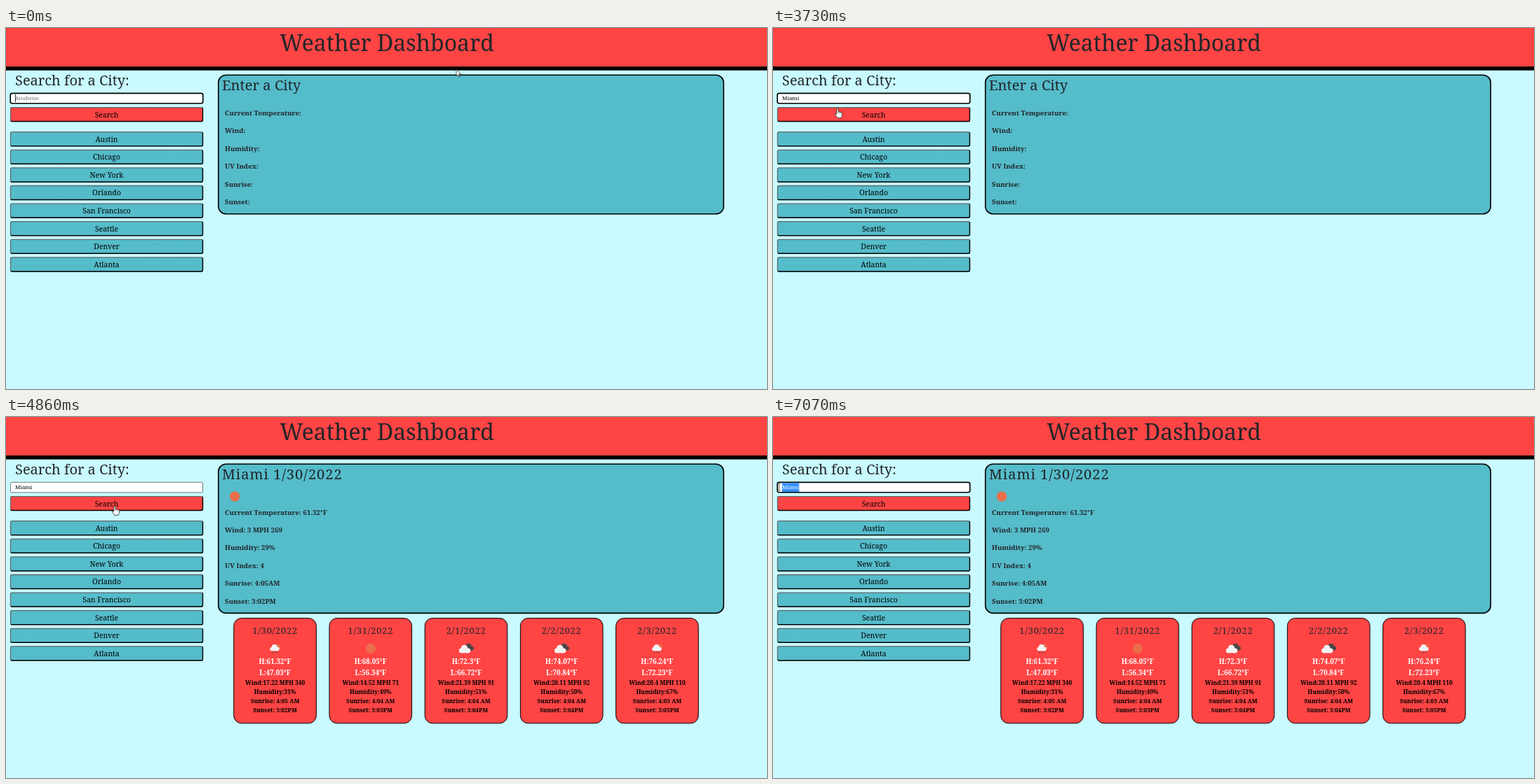
Recreate the animation shown at these times as an HTML page with a canvas. Size 1085 px wide and 516 px high, loop 8 s.

```html
<!DOCTYPE html>
<html lang="en">
<head>
<meta charset="utf-8">
<title>Weather Dashboard</title>
<style>
html, body { margin: 0; width: 100%; height: 100%; overflow: hidden; background: #c9faff; }
canvas { display: block; width: 1085px; height: 516px; }
</style>
</head>
<body>
<canvas id="stage"></canvas>
<script>
const W = 1085, H = 516, LOOP = 8000, TICK = 1000 / 15;
const RED = '#ff4444', TEAL = '#55bcca', SKY = '#c9faff', INK = '#212529', SUN = '#eb6e4b';
const FAMILY = '"Noto Serif", Cambria, serif';

const CITIES = ['Austin', 'Chicago', 'New York', 'Orlando', 'San Francisco', 'Seattle', 'Denver', 'Atlanta'];
const LABELS = ['Current Temperature:', 'Wind:', 'Humidity:', 'UV Index:', 'Sunrise:', 'Sunset:'];
const VALUES = ['61.32°F', '3 MPH 269', '29%', '4', '4:05AM', '3:02PM'];
const DAYS = [
  ['1/30/2022', rain, '61.32', '47.03', '17.22 MPH 340', '31', '4:05', '3:02'],
  ['1/31/2022', sun, '68.05', '56.34', '14.52 MPH 71', '49', '4:04', '3:03'],
  ['2/1/2022', clouds, '72.3', '66.72', '21.39 MPH 91', '51', '4:04', '3:04'],
  ['2/2/2022', clouds, '74.07', '70.84', '20.11 MPH 92', '50', '4:04', '3:04'],
  ['2/3/2022', rain, '76.24', '72.23', '20.4 MPH 110', '67', '4:03', '3:05']
];

const CITY = 'Miami';
const KEYS = [2060, 2260, 2460, 2600, 2730];
const BLUR = 4200, HEADING = 4390, DATA = 4860, FOCUS = 6330, DRAG = 6400;

// Pointer path: time, x, y
const PATH = [
  [0, 642, 59], [67, 642, 59], [333, 350, 115], [533, 160, 147], [800, 79, 104],
  [1267, 79, 104], [1600, 70, 105], [3667, 70, 105], [3733, 92, 115], [4267, 155, 127],
  [5000, 155, 127], [5200, 158, 150], [5400, 154, 171], [5533, 154, 171], [5733, 153, 170],
  [6000, 112, 136], [6333, 55, 100], [6400, 55, 100], [6867, 4, 99], [7000, 4, 99], [7067, 8, 100]
];

const canvas = document.getElementById('stage');
const dpr = window.devicePixelRatio || 1;
canvas.width = W * dpr;
canvas.height = H * dpr;
const c = canvas.getContext('2d');
c.scale(dpr, dpr);

function text(str, x, y, size, { color = INK, bold = false, align = 'left', gap = 0 } = {}) {
  c.font = `${bold ? 'bold ' : ''}${size}px ${FAMILY}`;
  c.letterSpacing = gap + 'px';
  c.textAlign = align;
  c.fillStyle = color;
  c.fillText(str, x, y);
  c.letterSpacing = '0px';
}

function box(x, y, w, h, r, fill, stroke, line) {
  c.beginPath();
  c.roundRect(x, y, w, h, r);
  c.fillStyle = fill;
  c.fill();
  if (!stroke) return;
  c.strokeStyle = stroke;
  c.lineWidth = line;
  c.stroke();
}

function poly(points, fill, stroke) {
  c.beginPath();
  points.forEach(([x, y]) => c.lineTo(x, y));
  c.closePath();
  c.fillStyle = fill;
  c.fill();
  if (stroke) {
    c.strokeStyle = stroke;
    c.lineWidth = 0.8;
    c.stroke();
  }
}

function disc(x, y, r, fill) {
  c.beginPath();
  c.arc(x, y, r, 0, Math.PI * 2);
  c.fillStyle = fill;
  c.fill();
}

function button(label, mid, fill) {
  const x = 6.5, y = mid - 10, w = 274, h = 20;
  box(x, y, w, h, 2, fill, '#60686a', 1.3);
  c.save();
  c.beginPath();
  [[x - 1, y + h + 1], [x + 2, y + h - 2], [x + w - 2, y + 2], [x + w + 1, y - 1], [x + w + 1, y + h + 1]]
    .forEach(p => c.lineTo(...p));
  c.clip();
  box(x, y, w, h, 2, fill, '#000', 1.5);
  c.restore();
  text(label, 143.5, mid + 3.9, 10.4, { color: '#000', align: 'center' });
}

function sun(x, y) {
  disc(x, y, 7.2, SUN);
}

function cloud(x, y, s, fill) {
  disc(x - 5 * s, y + 2 * s, 3.6 * s, fill);
  disc(x - 0.5 * s, y - 1.5 * s, 5 * s, fill);
  disc(x + 5 * s, y + 2 * s, 3.6 * s, fill);
  c.fillRect(x - 5 * s, y, 10 * s, 5.6 * s);
}

function clouds(x, y) {
  cloud(x + 4, y - 2, 0.8, '#484849');
  cloud(x - 2, y + 1, 0.95, '#f2f2f2');
}

function rain(x, y) {
  disc(x + 3.5, y - 2.5, 4, SUN);
  cloud(x - 0.5, y - 1, 0.78, '#f2f2f2');
  c.strokeStyle = '#6b4a4c';
  c.lineWidth = 0.9;
  for (let i = -1; i < 2; i++) {
    c.beginPath();
    c.moveTo(x + i * 3.2, y + 4);
    c.lineTo(x + i * 3.2 - 1, y + 6.8);
    c.stroke();
  }
}

function pointerAt(t) {
  const i = PATH.findIndex(k => k[0] > t);
  if (i < 0) return PATH[PATH.length - 1].slice(1);
  const [t0, x0, y0] = PATH[i - 1], [t1, x1, y1] = PATH[i];
  const p = (t - t0) / (t1 - t0);
  return [x0 + (x1 - x0) * p, y0 + (y1 - y0) * p];
}

function arrow(x, y) {
  poly([[0, 0], [0, 9.6], [2.2, 7.7], [3.7, 11], [5.2, 10.3], [3.8, 7.1], [6.6, 7]]
    .map(([a, b]) => [x + a, y + b]), '#fff', '#222');
}

function hand(x, y) {
  poly([[-1, 0.4], [0, 0], [1, 0.5], [1.2, 4.6], [3, 4.7], [4.6, 5.2], [6.2, 5.8], [6.6, 7],
    [6.3, 10.6], [5.2, 13.4], [-0.2, 13.4], [-1.8, 11], [-3.8, 8], [-3.2, 7], [-1.2, 8.2]]
    .map(([a, b]) => [x + a, y + b]), '#fff', '#222');
  c.beginPath();
  for (const dx of [1.2, 3, 4.7]) {
    c.moveTo(x + dx, y + 5);
    c.lineTo(x + dx, y + 7.2);
  }
  c.lineWidth = 0.5;
  c.stroke();
}

function beam(x, y) {
  x = Math.round(x) + 0.5;
  c.beginPath();
  c.moveTo(x - 2.3, y - 5.2);
  c.quadraticCurveTo(x, y - 5.2, x, y - 3.8);
  c.lineTo(x, y + 3.8);
  c.quadraticCurveTo(x, y + 5.2, x - 2.3, y + 5.2);
  c.moveTo(x + 2.3, y - 5.2);
  c.quadraticCurveTo(x, y - 5.2, x, y - 3.8);
  c.moveTo(x + 2.3, y + 5.2);
  c.quadraticCurveTo(x, y + 5.2, x, y + 3.8);
  c.strokeStyle = '#333';
  c.lineWidth = 0.8;
  c.stroke();
}

function pointer([x, y]) {
  const inColumn = x > 6 && x < 281;
  const onCity = y > 148 && y < 353 && (y - 148.1) % 25.6 < 21;
  if (y > 93 && y < 108 && x < 281) beam(x, y);
  else if (inColumn && (y > 113 && y < 134 || onCity)) hand(x, y);
  else arrow(x, y);
}

function field(t, mouseX) {
  const focused = t < BLUR || t >= FOCUS;
  const typed = CITY.slice(0, KEYS.filter(k => t >= k).length);
  const left = 13, base = 103.4, size = 7.9;
  if (focused) box(6.2, 93.4, 274.6, 14.4, 2.5, '#fff', '#000', 1.6);
  else box(6.5, 93.3, 274, 14.6, 1.5, '#fff', '#767676', 1);
  text(typed || 'Anaheim', left, base, size, { color: typed ? '#000' : '#757575' });
  const edge = n => left + c.measureText(typed.slice(0, n)).width;
  const end = edge(typed.length);

  if (t >= DRAG) {
    let n = 0;
    while (n < typed.length && (edge(n) + edge(n + 1)) / 2 < mouseX) n++;
    if (n < typed.length) {
      c.fillStyle = '#3390ff';
      c.fillRect(edge(n), 94.5, end - edge(n), 12.5);
      text(typed.slice(n), edge(n), base, size, { color: '#fff' });
      return;
    }
  }
  const since = [0, ...KEYS, FOCUS].filter(k => t >= k).pop();
  if (focused && Math.floor((t - since) / 525) % 2 === 0) {
    c.fillStyle = '#000';
    c.fillRect(Math.round(end), 95, 0.8, 11);
  }
}

function panel(t) {
  const found = t >= HEADING, shift = found ? 14.6 : 0;
  box(302.8, 67.2, 720.4, 198.6 + shift, 11, TEAL, '#000', 1.6);
  if (found) {
    text(CITY + ' 1/30/2022', 308, 89, 20.2, { gap: 0.9 });
    sun(326.2, 113.6);
  } else {
    text('Enter a City', 308, 89, 20.2);
  }
  LABELS.forEach((label, i) => {
    const line = t >= DATA ? label + ' ' + VALUES[i] : label;
    text(line, 312, 125 + shift + i * 25.4, 9.7, { bold: true });
  });
}

function card([date, icon, high, low, wind, humid, rise, set], i) {
  const x = 324.8 + i * 136.2, mid = x + 58.8;
  box(x, 287.6, 117.6, 150.2, 11, RED, '#000', 1);
  text(date, mid, 310, 13, { align: 'center', gap: 0.7 });
  icon(mid, 331);
  const row = (str, y, size, color) => text(str, mid, y, size, { color, bold: true, align: 'center' });
  row(`H:${high}°F`, 353.3, 9.9, '#fff');
  row(`L:${low}°F`, 368.5, 9.9, '#fff');
  row(`Wind:${wind}`, 382.5, 8.4, '#000');
  row(`Humidity:${humid}%`, 396.2, 8.4, '#000');
  row(`Sunrise: ${rise} AM`, 409.2, 8.3, '#000');
  row(`Sunset: ${set}PM`, 422.2, 8.3, '#000');
}

function draw(now) {
  const t = now % LOOP;
  const mouse = pointerAt(Math.floor((t + 10) / TICK) * TICK);
  c.fillStyle = SKY;
  c.fillRect(0, 0, W, H);
  c.fillStyle = RED;
  c.fillRect(0, 0, W, 55);
  c.fillStyle = '#000';
  c.fillRect(0, 55, W, 5.6);
  text('Weather Dashboard', 543, 32.5, 32, { align: 'center' });
  text('Search for a City:', 13, 82, 20);
  field(t, mouse[0]);
  button('Search', 123.6, RED);
  CITIES.forEach((city, i) => button(city, 158.7 + i * 25.6, TEAL));
  panel(t);
  if (t >= DATA) DAYS.forEach(card);
  pointer(mouse);
}

const start = performance.now();
function loop() {
  draw(performance.now() - start);
  requestAnimationFrame(loop);
}
loop();
</script>
</body>
</html>
```
